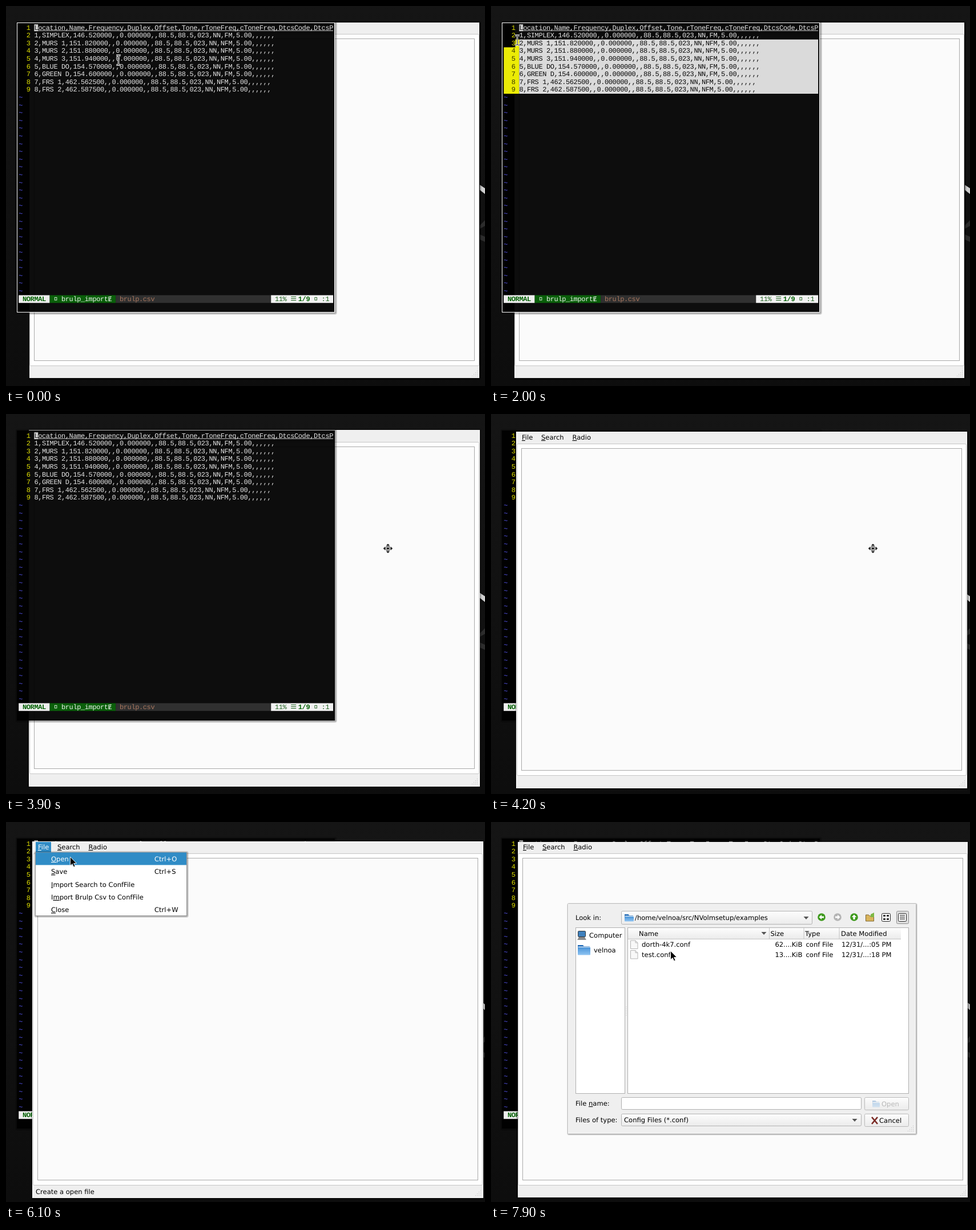
These frames come from a looping animation (839x667 px, 8 s). An HTML page:

```html
<!DOCTYPE html>
<html lang="en">
<head>
<meta charset="utf-8">
<title>Config import</title>
<style>
  html, body { margin: 0; width: 100%; height: 100%; overflow: hidden; background: #111; }
  svg { display: block; width: 839px; height: 667px; cursor: default; }
  text { white-space: pre; text-rendering: geometricPrecision; }
  .mono text { font: 12px "Liberation Mono", monospace; letter-spacing: calc(6.8px - .6001em); }
  .mono .bold { font-weight: bold; }
  .ui text { font: 11.56px "DejaVu Sans", sans-serif; }
  .key { text-decoration: underline; }
  .hide { display: none; }
</style>
</head>
<body>
<svg id="stage" viewBox="0 0 839 667">
  <defs>
    <linearGradient id="desk" x2="0" y2="1">
      <stop stop-color="#151515"/><stop offset="1" stop-color="#0d0d0d"/>
    </linearGradient>
    <linearGradient id="face" x2="0" y2="1">
      <stop stop-color="#fdfdfd"/><stop offset="1" stop-color="#ebebeb"/>
    </linearGradient>
    <linearGradient id="folder" x2="0" y2="1">
      <stop stop-color="#4a94d8"/><stop offset="1" stop-color="#8fc4f2"/>
    </linearGradient>
    <clipPath id="picked"></clipPath>
  </defs>
  <rect width="839" height="667" fill="url(#desk)"/>
  <path d="M830 314l9 6v10l-9-7z" fill="#cfcfcf"/>
  <path d="M830 385l9-9v10l-9 5zM830 401l9 4v9l-9-4z" fill="#2c2c2c"/>
  <g id="win" class="ui"></g>
  <g id="term" class="mono"></g>
  <g id="dialog" class="ui"></g>
  <g id="pointer"></g>
</svg>
<script>
const $ = id => document.getElementById(id);
const CELL = 6.8, LINE = 13.6, LEFT = 22.2, TOP = 31.6, COLS = 81;
const BLUE = '#308cc6';

// Markup helpers
const rect = (x, y, w, h, fill, extra = '') =>
  `<rect x="${x}" y="${y}" width="${w}" height="${h}" fill="${fill}" ${extra}/>`;
const frame = (x, y, w, h, fill, stroke, rx = 0) =>
  rect(x + .5, y + .5, w - 1, h - 1, fill, `stroke="${stroke}" rx="${rx}"`);
const path = (d, fill, extra = '') => `<path d="${d}" fill="${fill}" ${extra}/>`;
const stroke = (d, color, width = 1, extra = '') =>
  path(d, 'none', `stroke="${color}" stroke-width="${width}" ${extra}`);
const group = (id, body) => `<g id="${id}">${body}</g>`;
const shade = (x, y, w, h) =>
  [6, 4, 2].map(s => rect(x, y, w + 1, h + 1, 'none', `stroke="#000" stroke-opacity=".12" stroke-width="${s}" rx="1"`)).join('');
// "&" marks the underlined shortcut letter; y is the middle of the line
const label = (x, y, str, fill = '#000', extra = '') =>
  `<text x="${x}" y="${y + 4}" fill="${fill}" ${extra}>${str.replace(/&(.)/, '<tspan class="key">$1</tspan>')}</text>`;
const grip = (x, y) => {
  let d = '';
  for (let i = 0; i < 4; i++)
    for (let j = 0; j <= i; j++) d += `M${x - j * 3} ${y - (3 - i) * 3}h1v1h-1z`;
  return path(d, '#bdbdbd');
};
const caret = (x, y) => path(`M${x - 4.5} ${y - 2}h9l-4.5 5z`, '#555');

// Terminal
const channels = [
  ['SIMPLEX', '146.520000', 'FM'], ['MURS 1', '151.820000', 'NFM'],
  ['MURS 2', '151.880000', 'NFM'], ['MURS 3', '151.940000', 'NFM'],
  ['BLUE DO', '154.570000', 'FM'], ['GREEN D', '154.600000', 'FM'],
  ['FRS 1', '462.562500', 'NFM'], ['FRS 2', '462.587500', 'NFM'],
];
const lines = ['Location,Name,Frequency,Duplex,Offset,Tone,rToneFreq,cToneFreq,DtcsCode,DtcsP',
  ...channels.map(([name, freq, mode], i) =>
    `${i + 1},${name},${freq},,0.000000,,88.5,88.5,023,NN,${mode},5.00,,,,,,`)];
const colX = col => LEFT + col * CELL;
const rowY = row => TOP + row * LINE;
const cells = (col, row, str, fill, cls = '') =>
  `<text x="${colX(col)}" y="${rowY(row) + 9.9}" fill="${fill}" class="${cls}">${str}</text>`;
const block = (from, to, row, fill) => rect(colX(from), rowY(row), (to - from) * CELL, LINE, fill);

const listing = (number, ink, cursor, letter) =>
  rect(colX(4), rowY(0) + .6, CELL, 12, cursor) +
  lines.map((line, i) => cells(2, i, i + 1, number) + cells(4, i, line, ink)).join('') +
  cells(4, 0, 'L', letter) +
  rect(colX(4), rowY(0) + 11.2, 77 * CELL, .9, ink);
const tofu = col => rect(colX(col) + 1.9, rowY(35) + 4, 3.6, 4.6, 'none', 'stroke="currentColor" stroke-width=".9"');

const statusLine =
  block(0, 8, 35, '#eee') + cells(1, 35, 'NORMAL', '#005f00', 'bold') +
  block(8, 25, 35, '#0a5f0a') + `<g color="#e4f0e4">${tofu(9)}</g>` +
  cells(11, 35, 'brulp_importE', '#eef5ee') +
  stroke(`M${colX(23) + 2} ${rowY(35) + 11}l3 -9`, '#eef5ee', .8) +
  block(25, 65, 35, '#303030') + cells(26, 35, 'brulp.csv', '#a9775f') +
  block(65, COLS, 35, '#f2f2f2') + cells(66, 35, '11%', '#1c5f1c') +
  stroke(`M${colX(70) + 1} ${rowY(35) + 2.9}h9m-9 3h9m-9 3h9`, '#1c5f1c') +
  cells(72, 35, '1/9', '#005f00', 'bold') + `<g color="#1c5f1c">${tofu(76)}</g>` +
  cells(78, 35, ':1', '#1c5f1c');

$('term').innerHTML =
  shade(19, 29, 557, 509) + rect(19, 29, 557, 509, '#000', 'fill-opacity=".95"') +
  listing('#e0e000', '#e4e4e4', '#cfcfcf', '#222') +
  Array.from({ length: 26 }, (_, i) => cells(0, i + 9, '~', '#5c5cff')).join('') +
  statusLine +
  `<g clip-path="url(#picked)">${rect(LEFT, TOP, 4 * CELL, 9 * LINE, '#ebeb06')}
   ${rect(colX(4), TOP, 77 * CELL, 9 * LINE, '#dadada')}${listing('#3a3a00', '#0a0a0a', '#666', '#111')}</g>` +
  group('termEdge', frame(19, 29, 557, 509, 'none', '#fff'));

// Main window
const menuItems = [['&Open', 'Ctrl+O'], ['&Save', 'Ctrl+S'], ['&Import Search to ConfFile', ''],
  ['I&mport Brulp Csv to ConfFile', ''], ['&Close', 'Ctrl+W']];
const menuRow = ([name, keys], i, fill) =>
  label(32, 30 + i * 22.3, name, fill) + label(213, 30 + i * 22.3, keys, fill);

$('win').innerHTML =
  shade(0, 0, 788, 624) + rect(0, 0, 788, 624, '#efefef') +
  frame(0, 20, 788, 583, '#fff', '#c6c6c6', 2) + frame(8, 28, 772, 566, '#fbfbfb', '#a9a9a9') +
  grip(784, 620) + label(9, 9, '&File') + label(43, 9, '&Search') + label(97.5, 9, '&Radio') +
  group('winEdge', frame(-1, -1, 790, 626, 'none', '#fff')) +
  group('menu', rect(5, 0, 27, 18.5, BLUE) + label(9, 9, '&File', '#fff') +
    shade(5, 19, 264, 110) + frame(4, 18, 266, 112, '#fff', '#9a9a9a') +
    menuItems.map((item, i) => menuRow(item, i, '#000')).join('')) +
  group('hover', rect(5, 18.5, 264, 22, BLUE) + menuRow(menuItems[0], 0, '#fff') +
    label(5, 614, 'Create a open file'));

// File dialog
const folder = (x, y, w, h) =>
  path(`M${x} ${y + 1}h${w * .4}l2 2h${w * .6 - 3}v${h - 3}h${1 - w}z`, '#1f68b4') +
  rect(x + .5, y + 3.6, w - 1, 1.4, '#e6f1fb') +
  rect(x, y + 5, w, h - 4.5, 'url(#folder)', 'rx="1"');
const disc = (x, color, turn) =>
  `<g transform="translate(${x} 167) rotate(${turn})"><circle r="6.8" fill="${color}"/>` +
  path('M-4.5 0l4.5-4.2v2.6h4v3.2h-4v2.6z', '#fff') + '</g>';
const page = y => path(`M244.5 ${y - 7}h8.5l4 4v10.5h-12.5z`, '#f8f8f8', 'stroke="#b4b4b4"') +
  stroke(`M253 ${y - 7}v4h4`, '#b4b4b4');
const entry = (y, name, size, type, date, fill = '#000') =>
  label(264, y, name, fill) + label(545.5, y, size, fill, 'text-anchor="end"') +
  label(551.5, y, type, fill) + label(614, y, date, fill);
const dates = ['12/31/...:05 PM', '12/31/...:18 PM'];
const dirs = ['build', 'examples', 'src'];
const dirEntry = (i, fill) => entry(215 + i * 17.5, dirs[i], '', 'Folder', dates[i % 2], fill) +
  folder(243, 208 + i * 17.5, 15, 13);
const button = (y, name, x, fill) => frame(654, y, 78, 23, 'url(#face)', '#b9b9b9', 2) + label(x, y + 11.5, name, fill);
const openIcon = opacity => `<g opacity="${opacity}">${folder(668, 488, 13, 12)}</g>`;

$('dialog').innerHTML =
  shade(136, 145, 607, 401) + frame(135, 144, 609, 403, '#efefef', '#fafafa') + grip(739, 542) +
  label(148, 168, 'Look in:') + frame(228, 156, 335, 24, 'url(#face)', '#b3b3b3', 2) +
  folder(234, 161, 16, 13) + label(252, 168, '/home/velnoa/src/NVolmsetup<tspan id="sub">/examples</tspan>') +
  caret(552, 168) + group('backOff', disc(579, '#b4b4b4', 0)) + group('backOn', disc(579, '#3f9a1e', 0)) +
  disc(607, '#b4b4b4', 180) + disc(636, '#3f9a1e', 90) +
  path('M656.5 163h5l2 2h7v9h-14z', '#d9b45c', 'stroke="#7d6530"') + path('M665 162l6-3v8h-6z', '#7db843') +
  frame(710, 156, 22, 23, '#dedede', '#8f8f8f', 2) +
  frame(684, 160, 16, 15, '#fff', '#222', 2) +
  path('M687 163h4v3h-4zm6 0h4v3h-4zm-6 6h4v3h-4zm6 0h4v3h-4z', '#333') +
  frame(713, 160, 15, 15, '#fff', '#222', 2) + stroke('M716 163.5h9m-9 2.5h9m-9 2.5h9m-9 2.5h9', '#333') +
  frame(148, 185, 87, 292, '#fff', '#b0b0b0') +
  frame(152, 191, 14, 11, '#3f80bd', '#333', 1) + path('M154 202h10l3 5h-16z', '#8a8a8a') + label(172, 199, 'Computer') +
  folder(152, 215, 22, 18) + label(180, 225, 'velnoa') +
  stroke('M237 324v18', '#c4c4c4', 1, 'stroke-dasharray="1 2"') +
  frame(239, 185, 493, 292, '#fff', '#b0b0b0') + rect(240, 186, 478, 19, 'url(#face)') +
  stroke('M240 205.5h478M487.5 186v19m60.5-19v19m62-19v19', '#c4c4c4') +
  label(259, 195.5, 'Name') + label(489.5, 195.5, 'Size') + label(550, 195.5, 'Type') +
  label(613, 195.5, 'Date Modified') + caret(478, 195) +
  label(148, 494, 'File &name:') + frame(228, 483, 421, 22, '#fff', '#b0b0b0', 2) +
  button(483, 'Open', 684, '#b8b8b8') + openIcon(.3) +
  label(148, 523, 'Files of type:') + frame(228, 512, 421, 22, 'url(#face)', '#b3b3b3', 2) +
  label(233, 523, 'Config Files (*.conf)') + caret(637, 523) + button(512, 'Cancel', 680, '#000') +
  stroke('M667 518l10 12m0-12l-10 12', '#7a2a24', 2.6) +
  group('dirView', dirs.map((_, i) => dirEntry(i, '#000')).join('')) +
  group('fileView', page(215) + page(232.5) +
    entry(215, 'dorth-4k7.conf', '62....KiB', 'conf File', dates[0]) +
    entry(232.5, 'test.conf', '13....KiB', 'conf File', dates[1])) +
  group('chosen', rect(240, 224, 491, 17.5, BLUE) + dirEntry(1, '#fff') + label(232, 494, 'examples') +
    button(483, 'Open', 684, '#000') + openIcon(1)) +
  group('fieldFocus', frame(228, 483, 421, 22, 'none', '#4f97c9', 2)) +
  group('textCaret', rect(231, 487, 1, 14, '#000'));

// Pointers, drawn around their hot spot
const beam = 'M-4 -8.5h2.5q1.5 0 1.5 1.5v14q0 1.5 -1.5 1.5h-2.5M4 -8.5h-2.5q-1.5 0 -1.5 1.5M0 7q0 1.5 1.5 1.5h2.5';
const arms = [0, 90, 180, 270].map(a =>
  `<path transform="rotate(${a})" d="M0 -8.5l4 4h-8z" fill="#000" stroke="#fff" stroke-width=".8"/>`).join('');
$('pointer').innerHTML =
  group('beam', stroke(beam, '#fff', 2.8) + stroke(beam, '#111', 1)) +
  group('arrow', path('M-.5 -.8v15.5l3.6 -3.3 2.5 5.6 2.5 -1.1 -2.5 -5.4h4.9z', '#000', 'stroke="#fff" stroke-width=".9"')) +
  group('move', rect(-5, -5, 10, 10, '#fff') + arms + frame(-4, -4, 8, 8, '#fff', '#000', 2) +
    '<circle r="2" fill="#000"/>');

// Keys: [time, x, y, glide]; a gliding key is reached evenly from the one before
const pointerKeys = [
  [0, 197, 95], [200, 199, 97], [400, 240, 115], [800, 470, 180, 1], [1100, 470, 147, 1],
  [1200, 468, 146], [2000, 46, 60, 1], [2100, 46, 56], [2200, 41, 49], [2500, 63, 141, 1],
  [3300, 247, 173], [3700, 686, 229, 1], [3900, 669, 236], [4300, 670, 237], [4500, 671, 239],
  [4700, 430, 150], [4900, 52, 45, 1], [5100, 44, 41], [5300, 50, 43], [5500, 66, 47, 1],
  [5800, 90, 58], [5900, 113, 65], [6100, 113, 62], [6300, 440, 346], [6500, 452, 365],
  [6700, 371, 277], [6900, 330, 254], [7100, 311, 236], [7300, 307, 230, 1], [7700, 308, 228], [7900, 315, 227],
];
const windowKeys = [[0, 41, 29], [4100, 43, 30], [4200, 45, 32], [4300, 46, 33], [4400, 47, 34], [4700, 47, 35]];

function at(keys, t) {
  const i = keys.findLastIndex(k => k[0] <= t);
  const [t0, x, y] = keys[i], next = keys[i + 1];
  if (!next || !next[3]) return [x, y];
  const k = (t - t0) / (next[0] - t0);
  return [x + (next[1] - x) * k, y + (next[2] - y) * k];
}

function selection(t, [x, y]) {
  if (t < 1200 || t >= 3400) return '';
  let row = Math.floor((y - TOP) / LINE), col = Math.floor((x - LEFT) / CELL);
  if (t >= 2200) [row, col] = [t < 3300 ? 1 : 0, 2];
  return rect(colX(col), rowY(row), (COLS - col) * CELL, LINE, '#000') +
    rect(LEFT, rowY(row + 1), COLS * CELL, (8 - row) * LINE, '#000');
}

const show = (id, on) => $(id).classList.toggle('hide', !on);
const place = (id, [x, y]) => $(id).setAttribute('transform', `translate(${x} ${y})`);

function draw(t) {
  const within = (from, to = 8000) => t >= from && t < to;
  const pos = at(pointerKeys, t);
  const typing = within(0, 3600) || within(5100, 5300), moving = within(3900, 4700);
  place('pointer', pos);
  place('win', at(windowKeys, t));
  $('picked').innerHTML = selection(t, pos);

  const [below, above] = within(4100) ? ['term', 'win'] : ['win', 'term'];
  $('stage').insertBefore($(below), $('dialog'));
  $('stage').insertBefore($(above), $('dialog'));

  show('beam', typing);
  show('move', moving);
  show('arrow', !typing && !moving);
  show('termEdge', typing);
  show('winEdge', within(3600, 5100) || within(5300, 6300));
  show('menu', within(5700, 6300));
  show('hover', within(5900, 6300));
  show('dialog', within(6300));
  show('dirView', t < 7500);
  show('fileView', within(7500));
  show('sub', within(7500));
  show('backOff', t < 7500);
  show('backOn', within(7500));
  show('chosen', within(7100, 7500));
  show('fieldFocus', t < 7100);
  show('textCaret', t < 6900);
}

const start = performance.now();
let shown = -1;
function tick() {
  const t = Math.floor((performance.now() - start) % 8000 / 100) * 100;
  if (t !== shown) draw(shown = t);
  requestAnimationFrame(tick);
}
tick();
</script>
</body>
</html>
```
